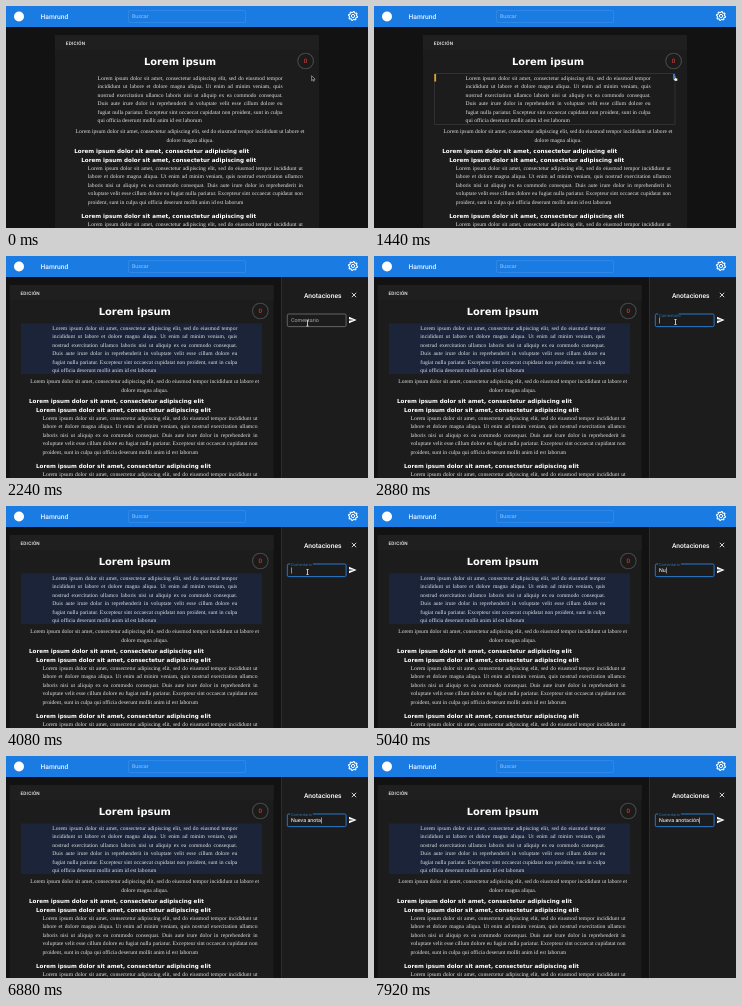
These frames come from a looping animation (362 px wide and 222 px high, 8000 ms). An HTML page with a canvas:

```html
<!DOCTYPE html>
<html lang="es">
<head>
<meta charset="utf-8">
<style>
html, body { margin: 0; width: 100%; height: 100%; overflow: hidden; background: #121212; }
canvas { display: block; width: 362px; height: 222px; }
</style>
</head>
<body>
<canvas id="stage"></canvas>
<script>
const W = 362, H = 222, LOOP = 8000;
const HOVER = 800, OPEN = 1520, FOCUS = 2720, TYPE = 4800;
const canvas = document.getElementById('stage');
const ctx = canvas.getContext('2d');
const dpr = window.devicePixelRatio || 1;
canvas.width = W * dpr;
canvas.height = H * dpr;

const SANS = 'Roboto, sans-serif';
const SERIF = '"Liberation Serif", serif';
const HEAD = '"DejaVu Sans", sans-serif';
const BLUE = '#2b83dc';

const NOTE = 'Nueva anotación';
const KEYS = [4800, 4960, 5100, 5240, 5380, 6240, 6340, 6460, 6570, 6680, 6790, 6900, 7030, 7440, 7600];

const HEADING = 'Lorem ipsum dolor sit amet, consectetur adipiscing elit';
const INTRO = HEADING + ', sed do eiusmod tempor';
const NARROW = [
  INTRO,
  'incididunt ut labore et dolore magna aliqua. Ut enim ad minim veniam, quis',
  'nostrud exercitation ullamco laboris nisi ut aliquip ex ea commodo consequat.',
  'Duis aute irure dolor in reprehenderit in voluptate velit esse cillum dolore eu',
  'fugiat nulla pariatur. Excepteur sint occaecat cupidatat non proident, sunt in culpa',
  'qui officia deserunt mollit anim id est laborum'
];
const WIDE = [
  INTRO + ' incididunt ut',
  'labore et dolore magna aliqua. Ut enim ad minim veniam, quis nostrud exercitation ullamco',
  'laboris nisi ut aliquip ex ea commodo consequat. Duis aute irure dolor in reprehenderit in',
  'voluptate velit esse cillum dolore eu fugiat nulla pariatur. Excepteur sint occaecat cupidatat non',
  'proident, sunt in culpa qui officia deserunt mollit anim id est laborum'
];

const clamp = v => Math.max(0, Math.min(1, v));
const ease = v => { v = clamp(v); return v * v * (3 - 2 * v); };
const mix = (a, b, k) => a + (b - a) * k;

function rect(x, y, w, h, color) {
  ctx.fillStyle = color;
  ctx.fillRect(x, y, w, h);
}

function text(str, x, y, font, color, align = 'left', spacing = 0) {
  ctx.font = font;
  ctx.fillStyle = color;
  ctx.textAlign = align;
  ctx.letterSpacing = spacing + 'px';
  ctx.fillText(str, x, y);
  ctx.letterSpacing = '0px';
}

function poly(points, fill, stroke, width = 0.5) {
  ctx.beginPath();
  points.forEach(([x, y]) => ctx.lineTo(x, y));
  ctx.closePath();
  if (fill) { ctx.fillStyle = fill; ctx.fill(); }
  if (stroke) { ctx.strokeStyle = stroke; ctx.lineWidth = width; ctx.stroke(); }
}

function circle(x, y, r, fill, stroke, width = 1) {
  ctx.beginPath();
  ctx.arc(x, y, r, 0, Math.PI * 2);
  if (fill) { ctx.fillStyle = fill; ctx.fill(); }
  if (stroke) { ctx.strokeStyle = stroke; ctx.lineWidth = width; ctx.stroke(); }
}

function outline(x, y, w, h, r, color, width) {
  ctx.beginPath();
  ctx.roundRect(x, y, w, h, r);
  ctx.strokeStyle = color;
  ctx.lineWidth = width;
  ctx.stroke();
}

function paragraph(lines, x, y, width, count = lines.length) {
  const font = '5.6px ' + SERIF, color = '#e4e4e4';
  ctx.font = font;
  for (let i = 0; i < count; i++) {
    const top = y + i * 8.45;
    if (i === lines.length - 1) { text(lines[i], x, top, font, color); continue; }
    const words = lines[i].split(' ');
    const sizes = words.map(w => ctx.measureText(w).width);
    const gap = (width - sizes.reduce((a, b) => a + b)) / (words.length - 1);
    let left = x;
    words.forEach((word, k) => {
      text(word, left, top, font, color);
      left += sizes[k] + gap;
    });
  }
}

function gear(x, y) {
  const points = [];
  for (let i = 0; i < 32; i++) {
    const r = i % 4 < 2 ? 4.5 : 3.5;
    const a = (i + 0.5) / 32 * Math.PI * 2;
    points.push([x + r * Math.cos(a), y + r * Math.sin(a)]);
  }
  poly(points, null, '#fff', 1.1);
  circle(x, y, 1.6, null, '#fff', 1);
}

function header() {
  rect(0, 0, W, 21, '#1a7be3');
  circle(13, 10.5, 5, '#fff');
  text('Hamrund', 34.5, 12.8, '500 6.7px ' + SANS, '#eaf3ff');
  outline(122.5, 4.5, 117, 12, 1.3, 'rgba(255,255,255,.16)', 0.6);
  text('Buscar', 126, 12.4, '5.36px ' + SANS, 'rgba(255,255,255,.55)');
  gear(347, 10);
}

function page(t) {
  const open = t >= OPEN;
  ctx.save();
  if (open) ctx.translate(-45.3, 0);
  rect(49, 29, 264, 193, '#1c1c1c');
  rect(49, 29, 264, 15, '#1f1f1f');
  text('EDICIÓN', 59.8, 38.6, '500 4.7px ' + SANS, '#f2f2f2', 'left', 0.2);

  if (open) rect(60.3, 67.5, 241, 50.5, '#1b2439');
  else if (t >= HOVER) {
    outline(60.5, 67.5, 240.5, 51, 0, '#404040', 0.6);
    rect(60.3, 68, 1.8, 7.5, '#e3a02c');
    rect(299, 68, 2, 5.5, '#2b7de0');
  }

  text('Lorem ipsum', 174, 59.3, 'bold 9.9px ' + HEAD, '#fff', 'center');
  circle(299.6, 55, 7.8, '#1b1b1b', '#484848', 1.1);
  text('0', 299.6, 57.2, '500 6.2px ' + SANS, '#d0382f', 'center');

  paragraph(NARROW, 91.6, 73.7, 185);
  const serif = '5.6px ' + SERIF;
  text(INTRO + ' incididunt ut labore et', 184, 127, serif, '#e4e4e4', 'center');
  text('dolore magna aliqua.', 184, 135.5, serif, '#e4e4e4', 'center');
  const bold = 'bold 5.6px ' + HEAD;
  text(HEADING, 68.3, 147.2, bold, '#fff');
  text(HEADING, 75.3, 156, bold, '#fff');
  paragraph(WIDE, 81.8, 163.9, 215);
  text(HEADING, 75.3, 211.9, bold, '#fff');
  paragraph(WIDE, 81.8, 220, 215, 1);
  ctx.restore();
}

function field(t) {
  const focused = t >= FOCUS;
  const k = ease((t - FOCUS) / 200);
  const hover = t >= 2200;
  const border = focused ? BLUE : hover ? '#a8a8a8' : '#484848';
  outline(281.3, 58, 58.8, 12.6, 1.4, border, focused ? 0.9 : 0.5);
  if (focused) rect(284.2, 57, 22.6 * k, 2, '#1c1c1c');
  const size = mix(5.36, 4.02, k);
  text('Comentario', 285, mix(66.1, 60.3, k), size + 'px ' + SANS, focused ? '#2f6fae' : '#a9a9a9');
  if (!focused) return;

  const typed = KEYS.filter(at => at <= t);
  const value = NOTE.slice(0, typed.length);
  text(value, 285, 66.1, '5.36px ' + SANS, '#fff');
  const last = typed.length ? typed[typed.length - 1] : FOCUS;
  if ((t - last) % 1000 < 500) {
    rect(285.2 + ctx.measureText(value).width, 61.5, 0.5, 6, '#fff');
  }
}

function drawer(t) {
  rect(275, 21, 87, 201, '#1c1c1c');
  rect(275, 21, 0.6, 201, '#3a3a3a');
  text('Anotaciones', 316.7, 42.2, '500 6.7px ' + SANS, '#fff', 'center');
  ctx.strokeStyle = '#fff';
  ctx.lineWidth = 0.8;
  ctx.beginPath();
  ctx.moveTo(345.8, 36.8); ctx.lineTo(350.2, 41.2);
  ctx.moveTo(350.2, 36.8); ctx.lineTo(345.8, 41.2);
  ctx.stroke();
  field(t);
  poly([[343, 60.8], [350.6, 64], [343, 67.2], [343, 64.7], [348, 64], [343, 63.3]], '#fff');
}

function arrow(x, y) {
  poly([[x, y], [x, y + 5], [x + 1.2, y + 4], [x + 2, y + 5.6], [x + 2.7, y + 5.2],
    [x + 2, y + 3.7], [x + 3.5, y + 3.5]], '#111', '#e8e8e8', 0.5);
}

function hand(x, y) {
  poly([[x, y], [x + 0.9, y], [x + 0.9, y + 2], [x + 3, y + 2.5], [x + 2.8, y + 5],
    [x + 0.2, y + 5], [x - 1.1, y + 2.8], [x, y + 3]], '#fff', '#222', 0.35);
}

function beam(x, y) {
  rect(x - 0.4, y - 2.6, 0.8, 5.2, '#f0f0f0');
  rect(x - 1.3, y - 2.9, 2.6, 0.6, '#f0f0f0');
  rect(x - 1.3, y + 2.3, 2.6, 0.6, '#f0f0f0');
}

function pointer(t) {
  if (t >= TYPE) return;
  if (t < OPEN) {
    const x = mix(305.6, 300.5, ease((t - 400) / 700));
    if (t < 1000) arrow(x, 69.7);
    else hand(x, 70);
    return;
  }
  const y = mix(72, 66, ease((t - 1900) / 500));
  if (t < 2200) arrow(300.4, y - 2.3);
  else beam(301.5, y);
}

function draw(now) {
  const t = now % LOOP;
  ctx.setTransform(dpr, 0, 0, dpr, 0, 0);
  ctx.textRendering = 'geometricPrecision';
  rect(0, 0, W, H, '#121212');
  page(t);
  if (t >= OPEN) drawer(t);
  header();
  pointer(t);
}

const start = performance.now();
function tick() {
  draw(performance.now() - start);
  requestAnimationFrame(tick);
}
tick();
</script>
</body>
</html>
```
